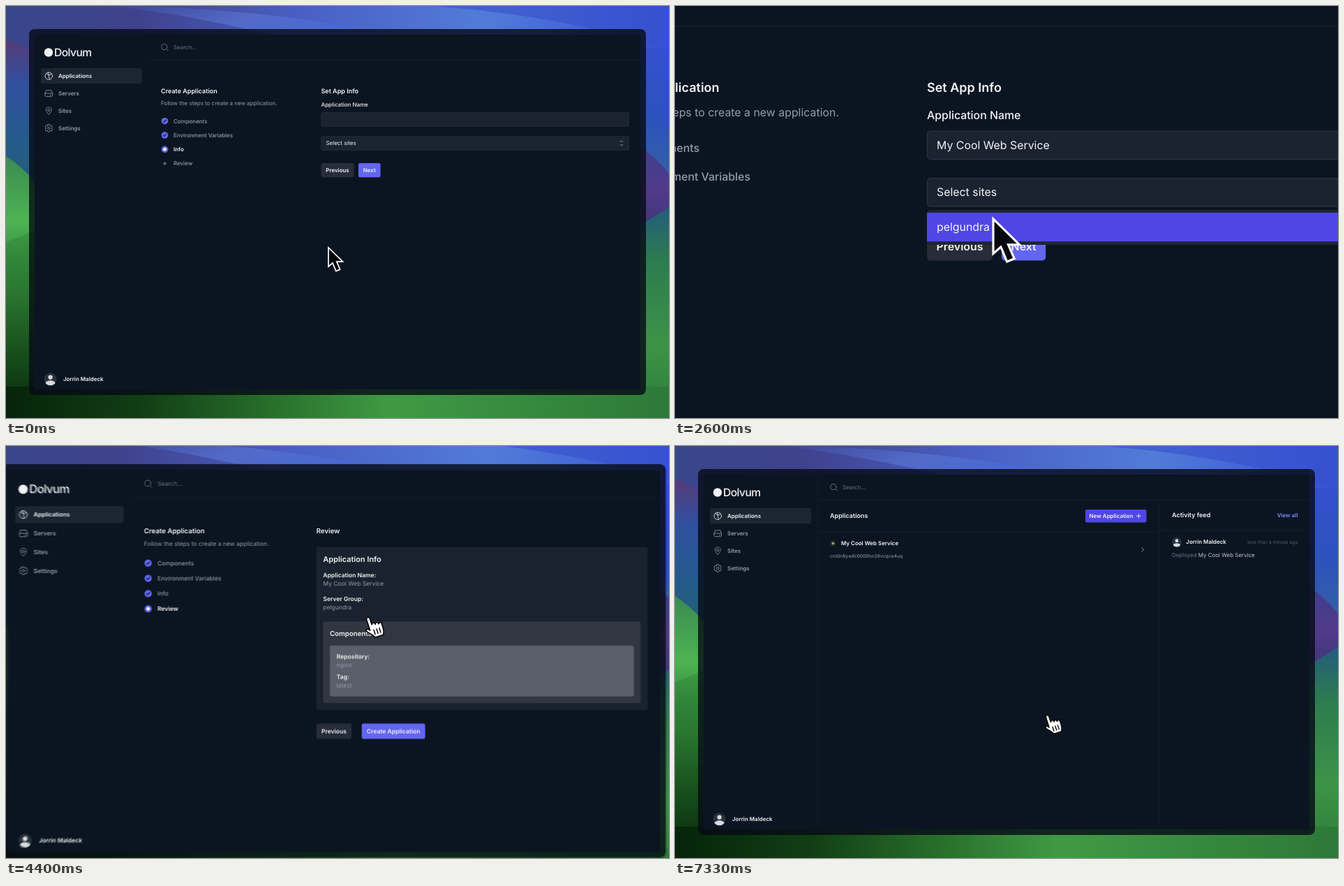
An HTML page for the animation above (7390 ms loop, 950 by 590 pixels).

```html
<!DOCTYPE html>
<html lang="en">
<head>
<meta charset="utf-8">
<title>Create application</title>
<style>
html, body { margin: 0; width: 100%; height: 100%; overflow: hidden; background: #0b1522; }
svg { display: block; width: 950px; height: 590px; }
text { font-family: Inter, Roboto, sans-serif; white-space: pre; }
</style>
</head>
<body>
<svg id="stage" viewBox="0 0 950 590" text-rendering="geometricPrecision"></svg>
<script>
const LOOP = 7390;
const FOCUS = { x: 542, y: 126 };
const USER = 'Jorrin Maldeck', SITE = 'pelgundra', APP = 'My Cool Web Service';
const WHITE = '#f3f4f6', GRAY = '#949ca9', DIM = '#6b7280', INDIGO = '#6366f1', LINE = '#17212e';

// ---- drawing helpers ----
const text = (x, y, str, { size = 7.95, weight = 500, fill = WHITE, attrs = '' } = {}) =>
  `<text x="${x}" y="${y + size * 0.36}" font-size="${size}" font-weight="${weight}" fill="${fill}" ${attrs}>${str}</text>`;
const title = (x, y, str, size = 9) => text(x, y, str, { size, weight: 600 });
const box = (x1, y1, x2, y2, fill, attrs = '', r = 2.6) =>
  `<rect x="${x1}" y="${y1}" width="${x2 - x1}" height="${y2 - y1}" rx="${r}" fill="${fill}" ${attrs}/>`;
const dot = (x, y, r, fill) => `<circle cx="${x}" cy="${y}" r="${r}" fill="${fill}"/>`;
const stroke = (d, color, width = 0.8, at = [0, 0]) =>
  `<path d="${d}" transform="translate(${at})" fill="none" stroke="${color}" stroke-width="${width}" stroke-linecap="round" stroke-linejoin="round"/>`;
const button = (x1, y1, x2, label, fill, id = '') =>
  box(x1, y1, x2, y1 + 20.4, fill, id && `id="${id}"`) +
  text((x1 + x2) / 2, y1 + 10.2, label, { weight: 600, attrs: 'text-anchor="middle"' });
const gradient = (id, dir, stops) => `<linearGradient id="${id}" ${dir}>` +
  stops.map(([at, c]) => `<stop offset="${at}" stop-color="${c}"/>`).join('') + '</linearGradient>';
const avatar = (x, y, r) => `<g transform="translate(${x} ${y}) scale(${r / 9})">${dot(0, 0, 9, '#28313d')}
  ${dot(0, -2.6, 3.1, '#d7dade')}<path d="M-7 5.7C-5.5 0.8 5.5 0.8 7 5.7A9 9 0 0 1 -7 5.7Z" fill="#d7dade"/></g>`;

// ---- scene parts ----
const DOWN = 'x1="0" y1="0" x2="0" y2="1"';
const wallpaper = () => `<defs>
  ${gradient('sky', '', [[0, '#38468c'], [0.2, '#40428d'], [0.45, '#4960c4'], [0.72, '#527bd8'], [1, '#3551d4']])}
  ${gradient('band', 'x1="0" y1="0" x2="1" y2="0.3"', [[0, '#3e4899'], [0.5, '#5874d2'], [1, '#4667d8']])}
  ${gradient('leftBlue', DOWN, [[0, '#563b78'], [0.3, '#30509f'], [0.65, '#25598d'], [1, '#245f74']])}
  ${gradient('rightBlue', DOWN, [[0, '#3450cf'], [0.55, '#2d52bd'], [1, '#3562a1']])}
  ${gradient('purple', DOWN, [[0, '#36418f'], [0.5, '#513a8a'], [1, '#36346f']])}
  ${gradient('leftGreen', DOWN, [[0, '#3a8a51'], [0.25, '#4eb353'], [0.4, '#348b3c'], [0.75, '#174f1c'], [1, '#06260a']])}
  ${gradient('rightGreen', DOWN, [[0, '#235c7d'], [0.25, '#2d7b50'], [0.65, '#3c9347'], [1, '#2f7c3a']])}
  ${gradient('floor', '', [[0, '#06240a'], [0.2, '#113d14'], [0.4, '#286f2b'], [0.58, '#409a44'], [0.8, '#36883e'], [1, '#2d7938']])}
  </defs>
  <rect width="950" height="590" fill="url(#sky)"/>
  <path d="M190 0C330 5 460 18 590 50H420C300 22 240 10 150 0Z" fill="url(#band)" opacity=".7"/>
  <path d="M610 0C720 8 820 24 950 60V0Z" fill="#3850cd" opacity=".6"/>
  <path d="M0 48C30 56 60 75 90 110V260H0Z" fill="url(#leftBlue)"/>
  <rect x="870" y="60" width="80" height="190" fill="url(#rightBlue)"/>
  <path d="M870 180C905 196 930 214 950 240V345H870Z" fill="url(#purple)"/>
  <path d="M870 330C900 322 930 300 950 288V590H870Z" fill="url(#rightGreen)"/>
  <path d="M0 215C20 228 45 250 70 290V590H0Z" fill="url(#leftGreen)"/>
  <path d="M0 338C22 330 40 322 60 312V400H0Z" fill="#287a33" opacity=".35"/>
  <rect y="545" width="950" height="45" fill="url(#floor)"/>`;

const NAV = [
  ['Applications', 'M5.2 0A5.2 5.2 0 1 1 -5.2 0A5.2 5.2 0 1 1 5.2 0M-3.5 -3.5L0 -1L1 4.8M-1 -5L0 -1L4 -3'],
  ['Servers', 'M-5.3 0L-3.7 -4.3H3.7L5.3 0V3.2Q5.3 4.5 4 4.5H-4Q-5.3 4.5 -5.3 3.2ZH5.3M2 2.3H3.5'],
  ['Sites', 'M0 5.4C-6 0 -4.8 -5 0 -5S6 0 0 5.4M1.6 -.8A1.6 1.6 0 1 1 -1.6 -.8A1.6 1.6 0 1 1 1.6 -.8'],
  ['Settings', 'M-1.2 -5.2H1.2L1.8 -3.7L3.9 -3.9L5.1 -1.8L4.2 0L5.1 1.8L3.9 3.9L1.8 3.7L1.2 5.2H-1.2L-1.8 3.7L-3.9 3.9L-5.1 1.8L-4.2 0L-5.1 -1.8L-3.9 -3.9L-1.8 -3.7ZM1.7 0A1.7 1.7 0 1 1 -1.7 0A1.7 1.7 0 1 1 1.7 0'],
];

const shell = () => box(33, 33, 917, 557, '#050a14', 'opacity=".8"', 8) +
  box(41, 41, 909, 549, '#0b1522', '', 2) +
  dot(61, 66.5, 6.2, '#eef0f2') +
  text(69, 66, 'Dolvum', { size: 15.6, attrs: 'letter-spacing="-.55"' }) +
  box(50, 89, 195, 111.3, '#1b2630', '', 3) +
  NAV.map(([label, d], i) => {
    const y = 100.2 + i * 24.9, color = i ? GRAY : WHITE;
    return stroke(d, color, 0.8, [61.3, y]) + text(75, y, label, { weight: 600, fill: color });
  }).join('') +
  avatar(63.6, 534.3, 9) + text(82, 533.8, USER, { weight: 600 }) +
  stroke('M3 3L5 5M3.6 -.5A4.1 4.1 0 1 1 -4.6 -.5A4.1 4.1 0 1 1 3.6 -.5', DIM, 0.9, [227.5, 59]) +
  text(240, 59.2, 'Search...', { weight: 400, fill: DIM }) +
  stroke('M204.5 77.5H909', LINE, 0.7);

const steps = current => title(222, 121.5, 'Create Application') +
  text(222, 139, 'Follow the steps to create a new application.', { weight: 400, fill: GRAY }) +
  ['Components', 'Environment Variables', 'Info', 'Review'].map((label, i) => {
    const y = 164.7 + i * 20.3, x = 227.5;
    const mark = i > current ? dot(x, y, 2.2, '#59616e')
      : dot(x, y, 4.8, INDIGO) + (i < current ? stroke('M-1.8 .2L-.5 1.5L2 -1.6', '#111a2c', 1.1, [x, y]) : dot(x, y, 2.3, '#fff'));
    return mark + text(240, y, label, { fill: i === current ? WHITE : GRAY, weight: i === current ? 600 : 500 });
  }).join('');

const FIELD = 'stroke="#2c3441" stroke-width=".6"';
const formPage = () => steps(2) + title(451.5, 121.5, 'Set App Info') +
  text(451.5, 141, 'Application Name') +
  box(451.7, 152.5, 892.5, 172.7, '#1b2230', FIELD + ' id="field"') +
  text(458.5, 162.5, '', { weight: 400, attrs: 'id="typed"' }) +
  '<rect id="caret" y="157.8" width=".7" height="9.6" fill="#b6bac2"/>' +
  box(451.7, 186.4, 892.5, 206.6, '#1b2230', FIELD) +
  text(458.5, 196.4, '', { weight: 400, attrs: 'id="picked"' }) +
  stroke('M-1.9 -1.8L0 -3.7L1.9 -1.8M-1.9 1.8L0 3.7L1.9 1.8', '#a5abb5', 0.8, [882, 196.4]) +
  button(451.5, 224.9, 498.5, 'Previous', '#262d38') +
  button(505, 224.9, 536.6, 'Next', INDIGO, 'next') +
  `<g id="menu">${box(451.5, 209, 893, 234, '#1f2632')}${box(451.5, 211, 893, 231.6, '#4f46e5', '', 0)}
  ${text(458.5, 221.4, SITE, { weight: 400 })}</g>`;

const pair = (x, y, label, value, fill = GRAY) =>
  text(x, y, label, { weight: 600 }) + text(x, y + 11.3, value, { weight: 400, fill });
const reviewPage = () => steps(3) + title(451.5, 121.5, 'Review') +
  box(451.5, 143.5, 893, 360.5, '#1b222f', '', 3) + title(460.5, 159.2, 'Application Info', 10.2) +
  pair(460.5, 180.8, 'Application Name:', APP) + pair(460.5, 212.3, 'Server Group:', SITE) +
  box(460.5, 242.5, 883.7, 351.2, '#323641', '', 3) + title(469.5, 258.4, 'Components') +
  box(469.5, 274.5, 874.5, 342.3, '#5a6069', '', 3) +
  pair(478.5, 289.1, 'Repository:', 'nginx', '#969ca6') + pair(478.5, 316.2, 'Tag:', 'latest', '#969ca6') +
  button(451.5, 378.4, 498.5, 'Previous', '#262d38') +
  button(512, 378.4, 596.5, 'Create Application', INDIGO, 'create');

const appsPage = () => stroke('M204.5 41V549M694 77.5V549M204.5 123H694M694 121H909', LINE, 0.7) +
  title(222, 100.2, 'Applications') + box(588, 91, 675.5, 109.4, '#4f46e5') +
  text(593.6, 100.2, 'New Application', { weight: 600 }) + stroke('M-3 0H3M0 -3V3', WHITE, 0.9, [664.3, 100.2]) +
  dot(226.5, 139.5, 3.8, '#27301f') + dot(226.5, 139.5, 1.8, '#9aa66c') +
  text(238, 139.2, APP, { weight: 600 }) +
  text(222, 158, 'cm0n6yw6r0000hn28vvqce4uq', { size: 6.8, weight: 400, fill: GRAY }) +
  stroke('M-1.3 -2.7L1.4 0L-1.3 2.7', GRAY, 1, [670.3, 148.2]) +
  title(712, 99.2, 'Activity feed') +
  text(892.5, 99.2, 'View all', { weight: 600, fill: '#818cf8', attrs: 'text-anchor="end"' }) +
  avatar(719, 137.6, 6.8) + text(732.3, 137.2, USER, { weight: 600 }) +
  text(892.5, 137.2, 'less than a minute ago', { size: 6.8, weight: 400, fill: '#525b68', attrs: 'text-anchor="end"' }) +
  text(712, 156.2, `Deployed <tspan fill="#c0c5cd">${APP}</tspan>`, { weight: 400, fill: DIM });

const IBEAM = 'M-6.2 -15Q0 -15 0 -10.5V10.5Q0 15 -6.2 15M6.2 -15Q0 -15 0 -10.5M0 10.5Q0 15 6.2 15M-3 2H3';
const cursors = () => `
  <path id="arrow" d="M0 0V27.2L6 22L10.8 33.6L16.6 31.2L11.8 20.2H20.6Z" fill="#05070c" stroke="#fff" stroke-width="1.7" stroke-linejoin="miter"/>
  <g id="ibeam">${stroke(IBEAM, '#fff', 5)}${stroke(IBEAM, '#0b1018', 2)}</g>
  <g id="hand" transform="rotate(-18)">
    <path d="M-2.3 2A2.3 2.3 0 0 1 2.3 2V10.5A2.3 2.3 0 0 1 6.8 11.5A2.2 2.2 0 0 1 11.2 12.5A2.1 2.1 0 0 1 15.2 14V20Q15 24 12.8 28H1.5Q-1 23.5 -6 18.5Q-8.3 15 -5.8 14.2Q-4 14 -2.3 17Z" fill="#fff" stroke="#05070c" stroke-width="1.6" stroke-linejoin="round"/>
    ${stroke('M2.6 18V24M6.6 18V24M10.4 18V24', '#05070c', 1.4)}
  </g>`;

// ---- build: one live scene plus echoes that average into motion blur ----
const ECHOES = 5, SHUTTER = 14;
document.getElementById('stage').innerHTML = `
  <g class="view"><g id="scene">${wallpaper()}${shell()}
    <g id="form">${formPage()}</g><g id="review">${reviewPage()}</g><g id="apps">${appsPage()}</g></g></g>` +
  Array.from({ length: ECHOES - 1 }, (_, i) =>
    `<g class="view" opacity="${1 / (i + 2)}"><use href="#scene"/></g>`).join('') +
  `<g id="cursorView"><g id="cursor">${cursors()}</g></g>`;

const $ = id => document.getElementById(id);
const views = [...document.querySelectorAll('.view')];
const set = (el, name, value) => {
  if (el.getAttribute(name) !== String(value)) el.setAttribute(name, value);
};
const show = (el, on) => set(el, 'display', on ? 'inline' : 'none');
const write = (el, str) => { if (el.textContent !== str) el.textContent = str; };
const clamp = v => Math.min(1, Math.max(0, v));
const ease = v => v * v * v * (v * (6 * v - 15) + 10);
const between = (t, a, b) => t >= a && t < b;

// ---- timing ----
const spring = ms => {
  const w = Math.max(0, ms) * 0.00613;
  return 1 - (1 + w) * Math.exp(-w);
};
const zoom = t => 1 + spring(t - 685) - spring(t - 3710);
const camera = s => `translate(${FOCUS.x} ${FOCUS.y}) scale(${s}) translate(${-FOCUS.x} ${-FOCUS.y})`;

// start, end, x, y of each pointer move
const MOVES = [
  [150, 880, 509, 174.4], [1980, 2250, 505, 198], [2320, 2560, 499, 215.5],
  [2850, 3220, 520, 237.4], [4850, 5500, 533, 386],
];
const CLICKS = [840, 2280, 2610, 3360, 6160];
const pointer = t => MOVES.reduce(([x, y], [a, b, tx, ty]) => {
  const k = ease(clamp((t - a) / (b - a)));
  return [x + (tx - x) * k, y + (ty - y) * k];
}, [462, 346]);
const press = t => 1 - 0.09 * Math.max(...CLICKS.map(c => clamp(1.4 - Math.abs(t - c) / 90)));

function draw(t) {
  const page = t < 3400 ? 'form' : t < 6400 ? 'review' : 'apps';
  for (const id of ['form', 'review', 'apps']) show($(id), id === page);

  const focused = between(t, 850, 2280);
  set($('field'), 'stroke', focused ? INDIGO : '#2c3441');
  set($('field'), 'stroke-width', focused ? 1.2 : 0.6);
  write($('typed'), APP.slice(0, Math.floor(clamp((t - 1030) / 900) * APP.length)));
  show($('caret'), focused);
  if (focused) set($('caret'), 'x', 458.4 + $('typed').getComputedTextLength());
  show($('menu'), between(t, 2310, 2680));
  write($('picked'), t < 2680 ? 'Select sites' : SITE);
  set($('next'), 'fill', t > 3120 ? '#818cf8' : INDIGO);
  set($('create'), 'fill', t > 5350 ? '#818cf8' : INDIGO);

  const s = zoom(t);
  const blurred = Math.abs(zoom(t + SHUTTER / 2) - zoom(t - SHUTTER / 2)) > 0.002;
  views.forEach((view, i) => {
    show(view, blurred || i === 0);
    const shift = blurred ? SHUTTER * (i / (ECHOES - 1) - 0.5) : 0;
    set(view, 'transform', camera(zoom(t + shift)));
  });

  const [x, y] = pointer(t);
  const shape = between(t, 780, 2040) ? 'ibeam'
    : between(t, 3120, 4960) || t >= 5350 ? 'hand' : 'arrow';
  for (const id of ['arrow', 'ibeam', 'hand']) show($(id), id === shape);
  set($('cursorView'), 'transform', camera(s));
  set($('cursor'), 'transform', `translate(${x} ${y}) scale(${press(t)})`);
}

const start = performance.now();
function tick() {
  draw((performance.now() - start) % LOOP);
  requestAnimationFrame(tick);
}
tick();
</script>
</body>
</html>
```
